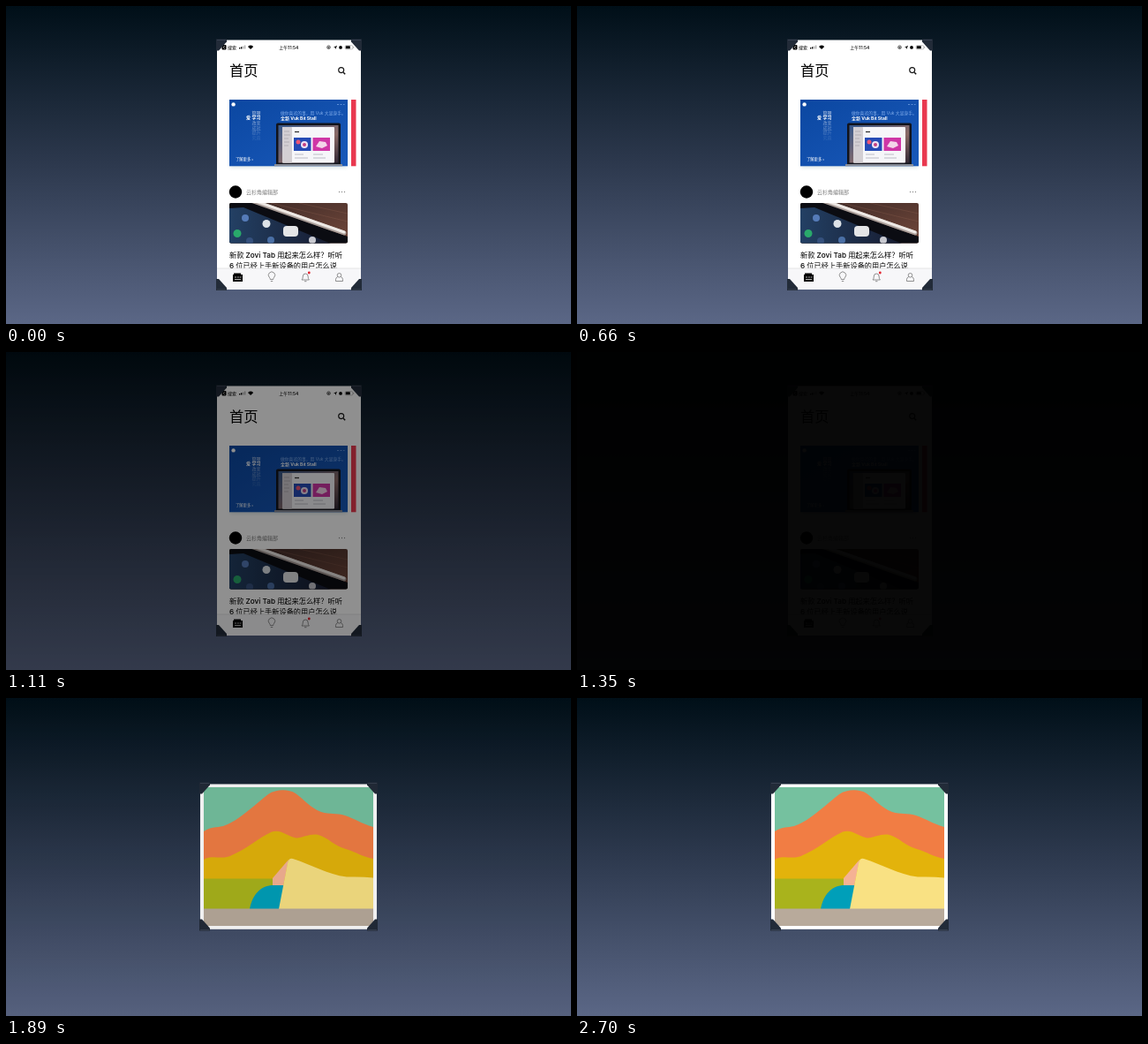
Animation, 640 px wide and 360 px high, one loop 2.73 s. Source, as an HTML page:

```html
<!DOCTYPE html>
<html lang="zh">
<head>
<meta charset="utf-8">
<style>
  html, body { margin: 0; height: 100%; overflow: hidden; background: #000; }
  svg { display: block; width: 100vw; height: 100vh; }
  text { font-family: Inter, "Noto Sans CJK SC", "Noto Sans CJK", sans-serif; font-size: 5px; }
  .line { fill: none; stroke: #777; stroke-width: .8; }
  .bold { font-weight: 700; }
  .medium { font-weight: 500; }
</style>
</head>
<body>
<svg viewBox="0 0 640 360">
  <defs>
    <linearGradient id="night" x2="0" y2="1">
      <stop stop-color="#000f18"/><stop offset=".5" stop-color="#2d394e"/><stop offset="1" stop-color="#5b6786"/>
    </linearGradient>
    <linearGradient id="blue" x2="1" y2="1">
      <stop stop-color="#0b47a1"/><stop offset="1" stop-color="#1959ba"/>
    </linearGradient>
    <linearGradient id="desk" x2="1" y2="1">
      <stop stop-color="#36588c"/><stop offset=".6" stop-color="#8a6a66"/><stop offset="1" stop-color="#302733"/>
    </linearGradient>
    <linearGradient id="wood" x2="1" y2="1">
      <stop stop-color="#3a2825"/><stop offset="1" stop-color="#73483b"/>
    </linearGradient>
    <linearGradient id="screen" x2="1" y2="0">
      <stop stop-color="#234064"/><stop offset="1" stop-color="#171c30"/>
    </linearGradient>
    <filter id="soft" x="-10%" y="-20%" width="120%" height="140%"><feGaussianBlur stdDeviation="2"/></filter>
    <clipPath id="photo"><rect x="253" y="223" width="134" height="45.5" rx="2"/></clipPath>
    <g id="mount">
      <path d="M-1-2H11V1L2 11H-1Z" fill="#222b38"/>
      <path d="M0-1H10" stroke="#465060" stroke-width=".6"/>
    </g>
  </defs>

  <rect width="640" height="360" fill="url(#night)"/>

  <g id="phone">
    <rect x="239" y="38.5" width="163" height="282.5" fill="#fff"/>

    <!-- status bar -->
    <rect x="244.5" y="44" width="5" height="5.5" rx="1"/>
    <path d="M247.8 45.2l-1.6 1.5 1.6 1.5" fill="none" stroke="#fff" stroke-width=".7"/>
    <text x="251" y="48.7">搜索</text>
    <path d="M264 48.5v-1.5h1.3v1.5zM266 48.5v-2.3h1.3v2.3z"/>
    <path d="M268 48.5v-3h1.3v3zM270 48.5v-4h1.3v4z" fill="#aaa"/>
    <path d="M274 45.9q3.1-2.6 6.2 0L277.1 49Z"/>
    <text x="320.3" y="48.7" text-anchor="middle" class="medium">上午11:54</text>
    <circle cx="365.5" cy="46.7" r="1.8" fill="none" stroke="#111" stroke-width=".7"/>
    <path d="M364.7 46.2h1.6v1.4h-1.6zM371 46.7l4-2-1.7 4.2-.5-2zM377.3 45l1-1m2.2 1l-1-1"/>
    <circle cx="379" cy="46.9" r="1.9"/>
    <rect x="384.2" y="44.7" width="8.6" height="4.2" rx="1" fill="none" stroke="#888" stroke-width=".5"/>
    <rect x="384.8" y="45.3" width="5" height="3" rx=".5"/>
    <path d="M393.7 46v1.6" stroke="#888" stroke-width=".7"/>

    <text x="253" y="79" class="medium" style="font-size:16.3px">首页</text>
    <path d="M382.2 75.2l2 2" stroke="#111" stroke-width="1.4"/>
    <circle cx="379.7" cy="72.6" r="3" fill="none" stroke="#111" stroke-width="1.1"/>

    <!-- banner -->
    <rect x="254" y="110" width="132" height="73" fill="#8aa" opacity=".3" filter="url(#soft)"/>
    <rect x="253" y="106" width="134" height="75.3" fill="url(#blue)"/>
    <rect x="391" y="106" width="5.5" height="75.3" fill="#e9384f"/>
    <g fill="#fff">
      <circle cx="257.6" cy="111.4" r="2.2"/>
      <text x="272" y="128.3" class="bold">爱</text>
      <g id="verbs"></g>
      <text x="260" y="175" class="medium" style="font-size:4.3px">了解更多 ›</text>
      <text x="311" y="122.8" fill="#7fabea" style="font-size:4.8px">做你喜欢的事，用 Vuk 大显身手。</text>
      <text x="311" y="129" class="bold">全新 Vuk Bit Stall</text>
      <path d="M375 111.5h2m1.5 0h2m1.5 0h1.5" stroke="#7fabea" stroke-width=".7"/>
    </g>
    <path d="M306 180V134.500q0-2 2-2H377q2 0 2 2V180Z" fill="#11131b"/>
    <rect x="308.500" y="135" width="68" height="42.500" fill="url(#desk)"/>
    <rect x="313" y="137" width="59" height="40.500" rx="1" fill="#f6f6f9"/>
    <rect x="313" y="137" width="11" height="40.500" rx="1" fill="#d3cfd3"/>
    <path d="M315 142h6m-6 4h7m-7 4h5m-5 4h6m-6 4h5" stroke="#aaa6ad" stroke-width=".8"/>
    <path d="M327 142.500h5" stroke="#333" stroke-width="1.300"/>
    <path d="M327 168h10m11 0h11m-32 4h15m6 0h14" stroke="#bcbcc6" stroke-width="1"/>
    <rect x="326" y="149" width="19.500" height="15" fill="#254bb5"/>
    <circle cx="331" cy="154" r="2.500" fill="#ec5575"/>
    <circle cx="338" cy="157" r="4" fill="#eee3f4"/>
    <circle cx="338" cy="157" r="2" fill="#c13f82"/>
    <rect x="347.500" y="149" width="19.500" height="15" fill="#cf36a6"/>
    <path d="M351 159l4-6 7 1 2 4-6 3z" fill="#f4d4e9"/>
    <path d="M304 179h77v2.300h-77z" fill="#888d98"/>

    <!-- article -->
    <circle cx="260" cy="210.500" r="7.200"/>
    <text x="272" y="212.900" fill="#777" style="font-size:6px">云杉角编辑部</text>
    <path d="M377.500 210.500h6.500" stroke="#888" stroke-width="1.300" stroke-linecap="round" stroke-dasharray="0 3"/>
    <g clip-path="url(#photo)">
      <rect x="253" y="223" width="134" height="46" fill="url(#wood)"/>
      <path d="M300 223l87 21m-55-21l55 12" stroke="#8a5f50" stroke-width=".7" opacity=".5"/>
      <path d="M253 223h27l107 38v8H253Z" fill="#0b0c12"/>
      <path d="M253 229l16-1 99 41H253Z" fill="url(#screen)"/>
      <path d="M280 221l103 36" stroke="#a99d98" stroke-width="5" stroke-linecap="round"/>
      <path d="M280 220l103 36" stroke="#eee9e5" stroke-width="3" stroke-linecap="round"/>
      <circle cx="262" cy="257.500" r="4.500" fill="#29a96b"/>
      <circle cx="271" cy="240" r="4" fill="#557bb8"/>
      <circle cx="295" cy="246.500" r="4.500" fill="#dde2e7"/>
      <rect x="314" y="249" width="17" height="12" rx="4" fill="#e4e5e7"/>
      <circle cx="300" cy="265" r="4" fill="#4a6fa5"/>
      <circle cx="347" cy="265" r="4" fill="#c8c9d0"/>
      <circle cx="276" cy="266" r="4" fill="#35507d"/>
    </g>
    <g class="medium">
      <text x="253" y="285" style="font-size:8.200px">新款 Zovi Tab 用起来怎么样？听听</text>
      <text x="253" y="296.500" style="font-size:8.200px">6 位已经上手新设备的用户怎么说</text>
    </g>

    <!-- tab bar -->
    <rect x="239" y="297" width="163" height="24" fill="#f7f7f9"/>
    <path d="M239 297h163" stroke="#ccc" stroke-width=".5"/>
    <path d="M258 302.500h8v1.500h2v8h-11v-8h1z"/>
    <path d="M259 307h2m.8 0h2m.8 0h2M259 309.500h7" stroke="#ddd" stroke-width=".8"/>
    <path class="line" d="M299.300 309.500q0-1.300-1-2.300a3.700 3.700 0 1 1 5.400 0q-1 1-1 2.300zM299.800 311.500h2.400"/>
    <path class="line" d="M335 310q1.300-1 1.300-4 0-3 2.900-3t2.900 3q0 3 1.300 4zM338 311.700h2.500"/>
    <circle cx="343.300" cy="302" r="1.400" fill="#e2202c"/>
    <circle class="line" cx="377.500" cy="304.800" r="2.300"/>
    <path class="line" d="M375.700 306.500q-2.200 1-2.200 3v2h8v-2q0-2-2.200-3"/>

    <use href="#mount" transform="translate(239 39.500)"/>
    <use href="#mount" transform="translate(402 39.500) scale(-1 1)"/>
    <use href="#mount" transform="translate(239 320) scale(1 -1)"/>
    <use href="#mount" transform="translate(402 320) scale(-1)"/>
  </g>

  <g id="painting">
    <rect x="220" y="97.500" width="200" height="164.300" fill="#fff"/>
    <rect x="224" y="101" width="192" height="157" fill="#75c19f"/>
    <path fill="#f17d44" d="M224 151C234 145 238 147 246 145C264 139 280 122 297 109C306 103 320 103 328 108C338 115 344 124 357 129C367 132 374 130 384 133C396 137 402 142 416 146V239H224Z"/>
    <path fill="#e3b30b" d="M224 183C232 178 242 182 250 180C270 174 284 159 301 151.500C312 148 319 157 329 158.500C337 158 345 153 354 155C365 158 371 167 385 171C396 174 404 180 416 182V239H224Z"/>
    <path fill="#a9b31c" d="M224 204.500H302V239H224Z"/>
    <path fill="#f5b294" d="M302 204L320 183L314 213H302Z"/>
    <path fill="#009fb9" d="M276 239C279 222 289 212 303 212H316L311 239Z"/>
    <path fill="#f9e183" d="M309 239L319 187Q320 181 325 182C345 188 364 200 386 202.500Q403 202 416 203.500V239Z"/>
    <path fill="#b8aa9b" d="M224 238.500H416V258H224Z"/>
    <use href="#mount" transform="translate(220 97.500)"/>
    <use href="#mount" transform="translate(420 97.500) scale(-1 1)"/>
    <use href="#mount" transform="translate(220 261.500) scale(1 -1)"/>
    <use href="#mount" transform="translate(420 261.500) scale(-1)"/>
  </g>

  <rect id="shade" width="640" height="360"/>
</svg>
<script>
  const LOOP = 2730, STEP = 30, FADE = 675;
  const [phone, painting, shade, verbs] =
    ["phone", "painting", "shade", "verbs"].map(id => document.getElementById(id));

  verbs.innerHTML = ["管理", "学习", "改变", "成就", "提升", "究竟"].map((word, i) =>
    `<text x="278.500" y="${122.600 + i * 5.700}" class="${i === 1 ? "bold" : ""}"
      opacity="${i === 1 ? 1 : 0.75 - i * 0.12}">${word}</text>`).join("");

  function draw(now) {
    const t = Math.floor(now % LOOP / STEP) * STEP;
    const fromCut = t - LOOP / 2;
    phone.style.display = fromCut < 0 ? "" : "none";
    painting.style.display = fromCut < 0 ? "none" : "";
    const light = Math.sin(Math.PI / 2 * Math.min(1, Math.abs(fromCut) / FADE));
    shade.setAttribute("opacity", 1 - light);
  }

  const start = performance.now();
  function tick() {
    draw(performance.now() - start);
    requestAnimationFrame(tick);
  }
  tick();
</script>
</body>
</html>
```
